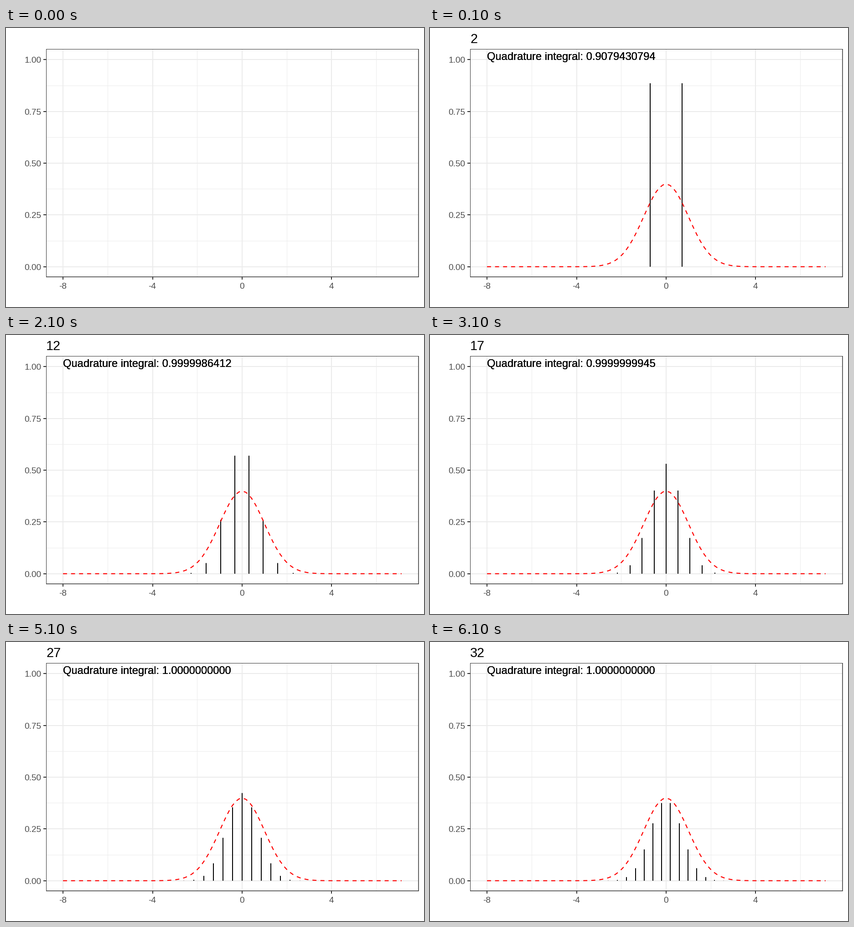
A matplotlib script that plays this animation: 917 by 611 pixels, repeating every 7100 ms.

```python
import numpy as np
import matplotlib.pyplot as plt
from matplotlib.animation import FuncAnimation
from matplotlib.collections import LineCollection

W, H, DPI = 917, 611, 64
PT = 72 / DPI                       # points per pixel
LEFT, RIGHT, TOP, BOTTOM = 88, 905, 46, 545
GRID, DARK, LABEL = "#EBEBEB", "#333333", "#4D4D4D"
ORDERS = range(2, 33, 5)
STEP_MS = 100

plt.rcParams["font.family"] = "Liberation Sans"
fig = plt.figure(figsize=(W / DPI, H / DPI), dpi=DPI, facecolor="white")
ax = fig.add_axes([0, 0, 1, 1])
ax.set_xlim(0, W)
ax.set_ylim(H, 0)
ax.axis("off")


def px(x):
    return 517.9 + 49.1 * np.asarray(x)


def py(y):
    return 522.8 - 453.4 * np.asarray(y)


def line(x0, y0, x1, y1, color, width, z):
    ax.plot([x0, x1], [y0, y1], color=color, lw=width * PT, zorder=z,
            solid_capstyle="butt", snap=False)


def label(x, y, text, size, color="black", **kw):
    return ax.text(x, y, text, fontsize=size * PT, color=color,
                   va="baseline", zorder=6, **kw)


# Grid
for v in (-6, -2, 2, 6):
    x = np.floor(px(v)) + 0.5
    line(x, TOP, x, BOTTOM, GRID, 1, 1)
for v in (0.125, 0.375, 0.625, 0.875):
    y = np.floor(py(v)) + 0.5
    line(LEFT, y, RIGHT, y, GRID, 1, 1)

# Major grid, ticks and tick labels
for v in (0, 0.25, 0.5, 0.75, 1):
    y = np.round(py(v))
    line(LEFT, y, RIGHT, y, GRID, 2, 2)
    line(82, y, LEFT, y, DARK, 2, 2)
    label(40, y + 7, f"{v:.2f}", 19, LABEL)
for v in (-8, -4, 0, 4):
    x = np.round(px(v))
    line(x, TOP, x, BOTTOM, GRID, 2, 2)
    line(x, BOTTOM, x, 551, DARK, 2, 2)
    label(px(v) - 0.5, 571, str(v), 19, LABEL, ha="center")

# Panel border
line(LEFT + 0.5, TOP, LEFT + 0.5, BOTTOM + 0.5, DARK, 1, 5)
line(LEFT, TOP + 0.5, RIGHT + 0.5, TOP + 0.5, DARK, 1, 5)
line(RIGHT, TOP, RIGHT, BOTTOM + 0.5, DARK, 1.5, 5)
line(LEFT, BOTTOM, RIGHT + 0.5, BOTTOM, DARK, 1.5, 5)


def quadrature(n):
    """Gauss-Hermite nodes, weights and the normal density's integral."""
    nodes, weights = np.polynomial.hermite.hermgauss(n)
    total = np.sum(weights * np.exp(nodes ** 2 / 2)) / np.sqrt(2 * np.pi)
    return nodes, weights, total


rules = [(n, *quadrature(n)) for n in ORDERS]

grid_x = np.linspace(-8, rules[-1][1].max(), 101)
density = np.exp(-grid_x ** 2 / 2) / np.sqrt(2 * np.pi)
curve, = ax.plot(px(grid_x), py(density), color="red", lw=2.2 * PT,
                 ls=(0, (4, 4)), dash_capstyle="butt", zorder=4)
bars = LineCollection([], colors="black", linewidths=2 * PT, zorder=3,
                      capstyle="butt", snap=False)
ax.add_collection(bars, autolim=False)
title = label(88, 33, "", 28.8)
# The caption is overprinted, which hardens its edges.
captions = [label(125, 70, "", 23.8) for _ in range(3)]


def update(i):
    shown = i > 0
    for artist in (curve, bars, title, *captions):
        artist.set_visible(shown)
    if shown:
        n, nodes, weights, total = rules[(i - 1) // 10]
        xs = np.round(px(nodes))
        bars.set_segments([[(x, py(0)), (x, py(w))]
                           for x, w in zip(xs, weights)])
        title.set_text(str(n))
        for caption in captions:
            caption.set_text(f"Quadrature integral: {total:.10f}")
    return curve, bars, title, *captions


anim = FuncAnimation(fig, update, frames=1 + 10 * len(rules),
                     interval=STEP_MS, repeat=True, repeat_delay=0)
plt.show()
```
